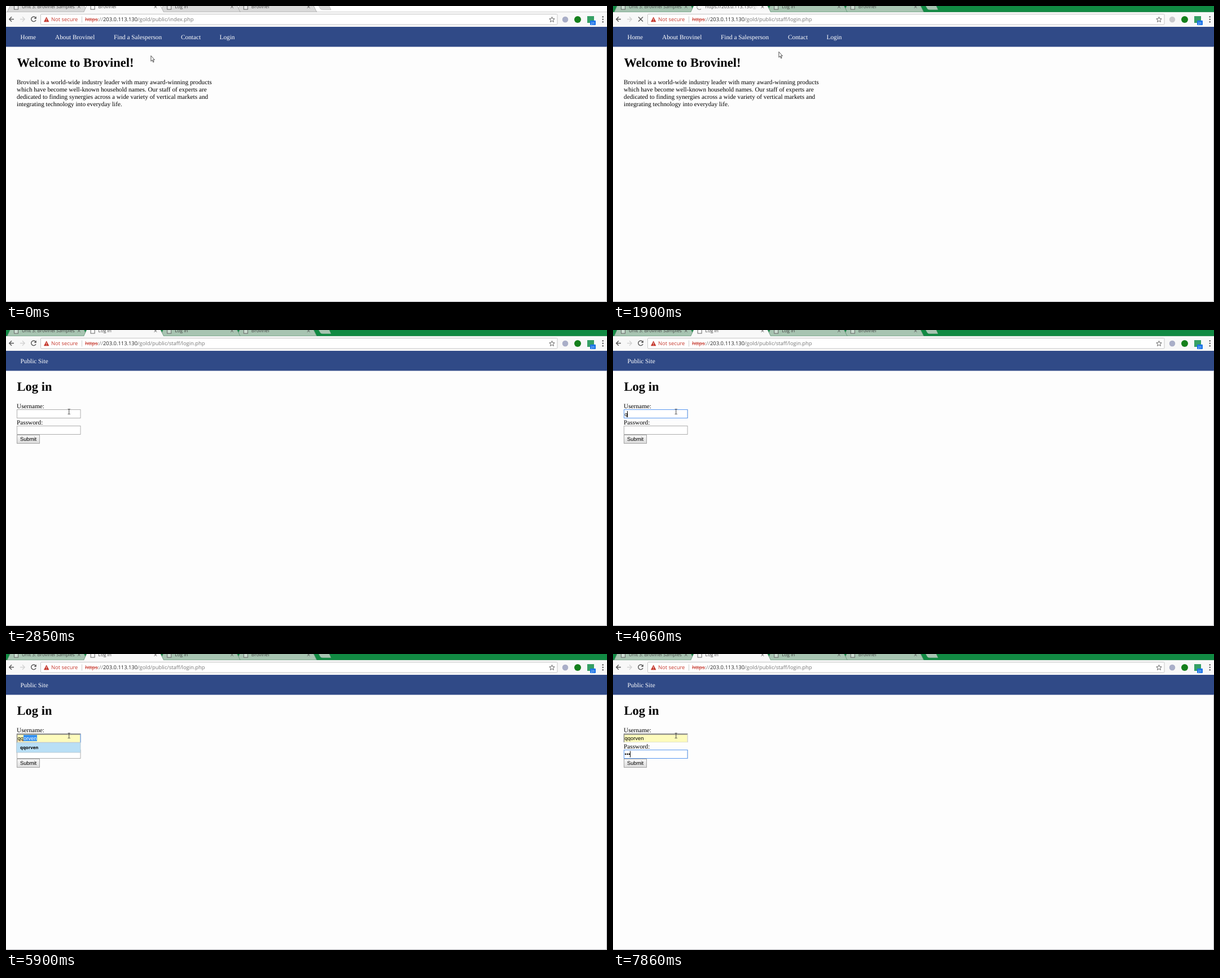
Recreate the animation shown at these times as an HTML page. Size 1065 px wide and 526 px high, loop 8000 ms.

```html
<!DOCTYPE html>
<html lang="en">
<head>
<meta charset="utf-8">
<title>Login walkthrough</title>
<style>
  html, body { margin: 0; width: 100%; height: 100%; overflow: hidden; }
  svg { display: block; width: 1065px; height: 526px; --strip: #fff; --tab: #d9d9d9; --edge: #a0a0a0; }
  svg.green { --strip: #118a43; --tab: #a7c4b1; --edge: #5c9272; }
  text { white-space: pre; text-rendering: geometricPrecision; }
  .ui { font: 9.4px "Open Sans", sans-serif; }
  .tab { font: 8.3px "Open Sans", sans-serif; fill: #444; }
  .page { font: 11.27px "Liberation Serif", serif; fill: #000; }
  .nav { font: 11.27px "Liberation Serif", serif; fill: #fff; }
  .h1 { font: bold 22.5px "Liberation Serif", serif; }
  .form { font: 9.39px "Liberation Sans", sans-serif; }
  .hint { font: bold 7.8px "Open Sans", sans-serif; }
  .line { fill: none; stroke: #555; stroke-width: 1.4; }
</style>
</head>
<body>
<svg id="stage" viewBox="0 0 1065 526" xmlns="http://www.w3.org/2000/svg"></svg>
<script>
const LOOP = 8000;
const stage = document.getElementById('stage');
const company = 'Brovinel', host = '203.0.113.130', user = 'qqorven';

const during = (from, to, html) => `<g data-on="${from},${to}">${html}</g>`;
const text = (x, y, cls, str, attrs = '') => `<text x="${x}" y="${y}" class="${cls}" ${attrs}>${str}</text>`;
const rect = (x, y, w, h, fill, attrs = '') => `<rect x="${x}" y="${y}" width="${w}" height="${h}" fill="${fill}" ${attrs}/>`;
const path = (d, attrs = 'class="line"') => `<path d="${d}" ${attrs}/>`;

// Browser tabs
const tabX = i => 135.6 * i;
const tabShape = (i, fill) =>
  path(`M${tabX(i) + 2} 11L${tabX(i) + 8.5} -3H${tabX(i) + 137}L${tabX(i) + 144} 11`, `fill="${fill}" stroke="var(--edge)" stroke-width=".8"`);
const pageIcon = i => rect(tabX(i) + 14.5, -3.5, 7, 9.5, '#fff', 'fill-opacity=".4" stroke="#666"');
const closeMark = i => path(`M${tabX(i) + 127} -.8l4.6 4.6m0 -4.6l-4.6 4.6`, 'stroke="#555" stroke-width="1"');
const tabTitle = (i, str) => text(tabX(i) + 28, 4.3, 'tab', str);

const tabs = [
  rect(0, 0, 1065, 12, 'var(--strip)'),
  path('M553 -2H572L576 6.8H561Q558 6.8 557 5Z', 'fill="var(--tab)" stroke="var(--edge)" stroke-width=".4"'),
  ...[3, 2, 0].map(i => tabShape(i, 'var(--tab)')),
  path('M0 10.7H1065', 'stroke="var(--edge)" stroke-width=".6"'),
  tabShape(1, '#f8f8f8'),
  during(970, 1090, tabShape(1, '#f1f1f1')),
  ...[0, 1, 2, 3].map(closeMark),
  ...[0, 2, 3].map(pageIcon),
  tabTitle(0, `Unit 3: ${company} Samples`), tabTitle(2, 'Log in'), tabTitle(3, company),
  during(0, 1230, pageIcon(1)),
  during(1230, 2030, '<path id="spinner" d="M156 -1.2A4.3 4.3 0 1 0 156 5.2" fill="none" stroke="#999" stroke-width="1.3"/>'),
  during(2030, LOOP, pageIcon(1)),
  during(0, 1480, tabTitle(1, company)),
  during(1480, 2030, `<g clip-path="url(#titleClip)">${tabTitle(1, `https://${host}/gold`)}</g>` + rect(238, 0, 20, 8, 'url(#fade)')),
  during(2030, LOOP, tabTitle(1, 'Log in')),
].join('');

// Address bar and tool buttons
const reload = path('M52.4 20.6A4.3 4.3 0 1 0 53 25') + path('M53.8 18.5V22.8H49.5Z', 'fill="#555"');
const address = file => text(140, 27.3, 'ui', `<tspan fill="#c5372c">https</tspan><tspan fill="#777">://</tspan>` +
  `<tspan x="172" fill="#222">${host}</tspan><tspan fill="#777">/gold/public/${file}</tspan>`);
const badgeText = text(1040, 32.6, '', '21', 'font-family="Open Sans, sans-serif" font-size="6" fill="#fff" text-anchor="middle"');
const toolbar = [
  rect(0, 11, 1065, 26, '#f8f8f8'),
  path('M14 23.5H6M10 19.3L5.8 23.5L10 27.7'),
  path('M25 23.5H33M29 19.3L33.2 23.5L29 27.7', 'fill="none" stroke="#d2d2d2" stroke-width="1.3"'),
  during(0, 1230, reload),
  during(1230, 2030, path('M45 19.5L53 27.5M53 19.5L45 27.5')),
  during(2030, LOOP, reload),
  rect(61.5, 14.5, 915.5, 18.5, '#fff', 'rx="1.5" stroke="#c6c6c6"'),
  path('M71.7 19.8L76 28H67.4Z', 'fill="#c5372c" stroke="#c5372c" stroke-linejoin="round" stroke-width=".6"'),
  path('M71.7 22.4V25M71.7 26V27', 'stroke="#fff" stroke-width=".9"'),
  text(80, 27.3, 'ui', 'Not secure', 'fill="#c5372c"'),
  path('M134.5 18.5V29.5', 'stroke="#ccc"'),
  during(0, 1480, address('index.php')),
  during(1480, LOOP, address('staff/login.php')),
  path('M140 24.2H163.5', 'stroke="#c5372c" stroke-width=".9"'),
  path('M967.5 19.3L968.8 22.6L972.2 22.8L969.5 25L970.4 28.4L967.5 26.5L964.6 28.4L965.5 25L962.8 22.8L966.2 22.6Z', 'fill="none" stroke="#555" stroke-width=".9"'),
  '<circle cx="991" cy="24" r="5.2" fill="#c9c9cc"/>',
  during(0, 1610, '<circle cx="991" cy="24" r="5.2" fill="#a9aec8"/>'),
  during(2180, LOOP, '<circle cx="991" cy="24" r="5.2" fill="#a9aec8"/>'),
  '<circle cx="1013" cy="24" r="6" fill="#15801c"/>',
  rect(1030, 18, 12, 12, '#36a065'),
  rect(1035, 25.7, 10, 8.3, '#1a73e8', 'rx="1"'), badgeText,
  ...[19.3, 23.8, 28.3].map(y => `<circle cx="1057.7" cy="${y}" r="1.2" fill="#555"/>`),
].join('');

// Web pages
const home = [
  ...[[25.5, 'Home'], [87, `About ${company}`], [191, 'Find a Salesperson'], [310, 'Contact'], [378.5, 'Login']]
    .map(([x, label]) => text(x, 59.2, 'nav', label)),
  text(19.5, 108, 'h1', `Welcome to ${company}!`),
  ...[`${company} is a world-wide industry leader with many award-winning products`,
    'which have become well-known household names. Our staff of experts are',
    'dedicated to finding synergies across a wide variety of vertical markets and',
    'integrating technology into everyday life.'].map((row, i) => text(19, 139 + 13 * i, 'page', row)),
].join('');

const field = (y, stroke = '#adadad') => rect(19.5, y + .5, 112.5, 15, '#fff', `stroke="${stroke}"`);
const filledField = rect(19, 142, 113, 15, '#fdfbbc') +
  path('M19.5 157V142.7H132', 'fill="none" stroke="#858585" stroke-width="1.4"') +
  path('M20 156.6H131.6V143', 'fill="none" stroke="#dcdcd0" stroke-width=".8"');
const caret = (from, to, x, y) => during(from, to, rect(x, y, 1, 11, '#000'));
const typed = (y, str) => text(20.6, y, 'form', str);
const hint = fill => rect(18.5, 157.5, 113.5, 17.5, fill, 'stroke="#b5c4cc" stroke-width=".8"') + text(25, 168.8, 'hint', user);

const login = [
  text(25.5, 59.2, 'nav', 'Public Site'),
  text(19.5, 108, 'h1', 'Log in'),
  text(19, 139, 'page', 'Username:'), text(19, 167.5, 'page', 'Password:'),
  field(141), field(170),
  rect(19.5, 186.5, 40, 15, 'url(#button)', 'stroke="#a3a3a3"'), text(25, 197.2, 'form', 'Submit'),
  during(3160, 5900, field(141, '#5897ef')),
  during(4060, 4600, typed(152.5, user.slice(0, 1))),
  during(4600, 5900, typed(152.5, user.slice(0, 2))),
  during(5900, LOOP, filledField),
  during(5900, 6020, path('M132 142V157.5', 'stroke="#5897ef"') + rect(31, 143.8, 24, 11, '#3390f0') +
    path('M21 154.2H31', 'stroke="#d65a4a" stroke-width=".9" stroke-dasharray="1.5 .8"') +
    typed(152.5, `${user.slice(0, 2)}<tspan fill="#fff">${user.slice(2)}</tspan>`)),
  during(4200, 5900, hint('#fff')),
  during(5900, 6020, hint('#b9dff5')),
  during(6020, LOOP, typed(152.5, user) + field(170, '#5897ef')),
  during(6990, 7570, typed(181.3, '•')),
  during(7570, 7860, typed(181.3, '••')),
  during(7860, LOOP, typed(181.3, '•••')),
  caret(3160, 3610, 21, 144), caret(4060, 4600, 25, 144),
  caret(4600, 5070, 31, 144), caret(5620, 5900, 31, 144),
  caret(6020, 6520, 21, 172.5), caret(6990, 7570, 23.5, 172.5),
  caret(7570, 7860, 27, 172.5), caret(7860, LOOP, 30, 172.5),
].join('');

// Pointer shapes, each with its own origin
const pointers = {
  arrow: path('M.4 .4V10.2L2.6 8.2L4.3 12L5.7 11.3L4 7.7H6.9Z', 'fill="#fff" stroke="#222" stroke-width=".8"'),
  hand: path('M2 1.2Q2.9 -.3 3.8 1.2V4.2Q5 3.4 5.7 4.5Q6.8 4 7.3 5Q8.6 4.7 8.7 6.2V8.6L7.6 12H2.8L.3 8.2Q-.3 6.7 .8 6.4L2 7.3Z', 'fill="#fff" stroke="#222" stroke-width=".7"'),
  beam: path('M-2 .5H-.6L0 1L.6 .5H2M0 1V9M-2 9.5H-.6L0 9L.6 9.5H2', 'fill="none" stroke="#333" stroke-width=".9"'),
};
const moves = [
  [0, 256.5, 88, 'arrow'], [150, 330, 79, 'arrow'], [270, 392, 71, 'arrow'], [410, 392.5, 64, 'hand'],
  [540, 392.5, 61, 'hand'], [1480, 368, 62, 'arrow'], [1610, 330, 62, 'arrow'], [1760, 293, 78, 'arrow'],
  [1900, 293.5, 81, 'arrow'], [2180, 289, 84, 'arrow'], [2340, 276, 95, 'arrow'], [2490, 150, 115, 'arrow'],
  [2610, 115, 128, 'arrow'], [2730, 112, 143, 'beam'], [2850, 111.7, 140, 'beam'],
];
const spinTimes = [1230, 1480, 1610, 1760, 1900];

stage.innerHTML = `<defs>
  <clipPath id="titleClip"><rect x="160" y="0" width="98" height="11"/></clipPath>
  <linearGradient id="fade"><stop stop-color="#f8f8f8" stop-opacity="0"/><stop offset="1" stop-color="#f8f8f8"/></linearGradient>
  <linearGradient id="button" x2="0" y2="1"><stop stop-color="#f8f8f8"/><stop offset="1" stop-color="#dcdcdc"/></linearGradient>
  </defs>` +
  rect(0, 0, 1065, 526, '#fdfdfd') + tabs + toolbar + rect(0, 37, 1065, 35.5, '#304a87') +
  during(0, 2030, home) + during(2030, LOOP, login) +
  path('M0 525.5H1064.5V73', 'fill="none" stroke="#b4b4b8"') +
  '<g id="pointer">' + Object.entries(pointers).map(([name, shape]) => `<g data-shape="${name}">${shape}</g>`).join('') + '</g>';

const timed = [...stage.querySelectorAll('[data-on]')].map(el => [el, ...el.dataset.on.split(',').map(Number)]);
const pointer = document.getElementById('pointer');
const spinner = document.getElementById('spinner');

function draw(t) {
  stage.classList.toggle('green', t >= 970);
  for (const [el, from, to] of timed) el.style.display = t >= from && t < to ? '' : 'none';
  const turns = spinTimes.filter(s => s <= t).length - spinTimes.length;
  spinner.setAttribute('transform', `rotate(${turns * -60} 153 2)`);
  const [, x, y, shape] = moves.findLast(m => m[0] <= t);
  pointer.setAttribute('transform', `translate(${x} ${y})`);
  for (const el of pointer.children) el.style.display = el.dataset.shape === shape ? '' : 'none';
}

function tick() {
  draw(performance.now() % LOOP);
  requestAnimationFrame(tick);
}
tick();
</script>
</body>
</html>
```
